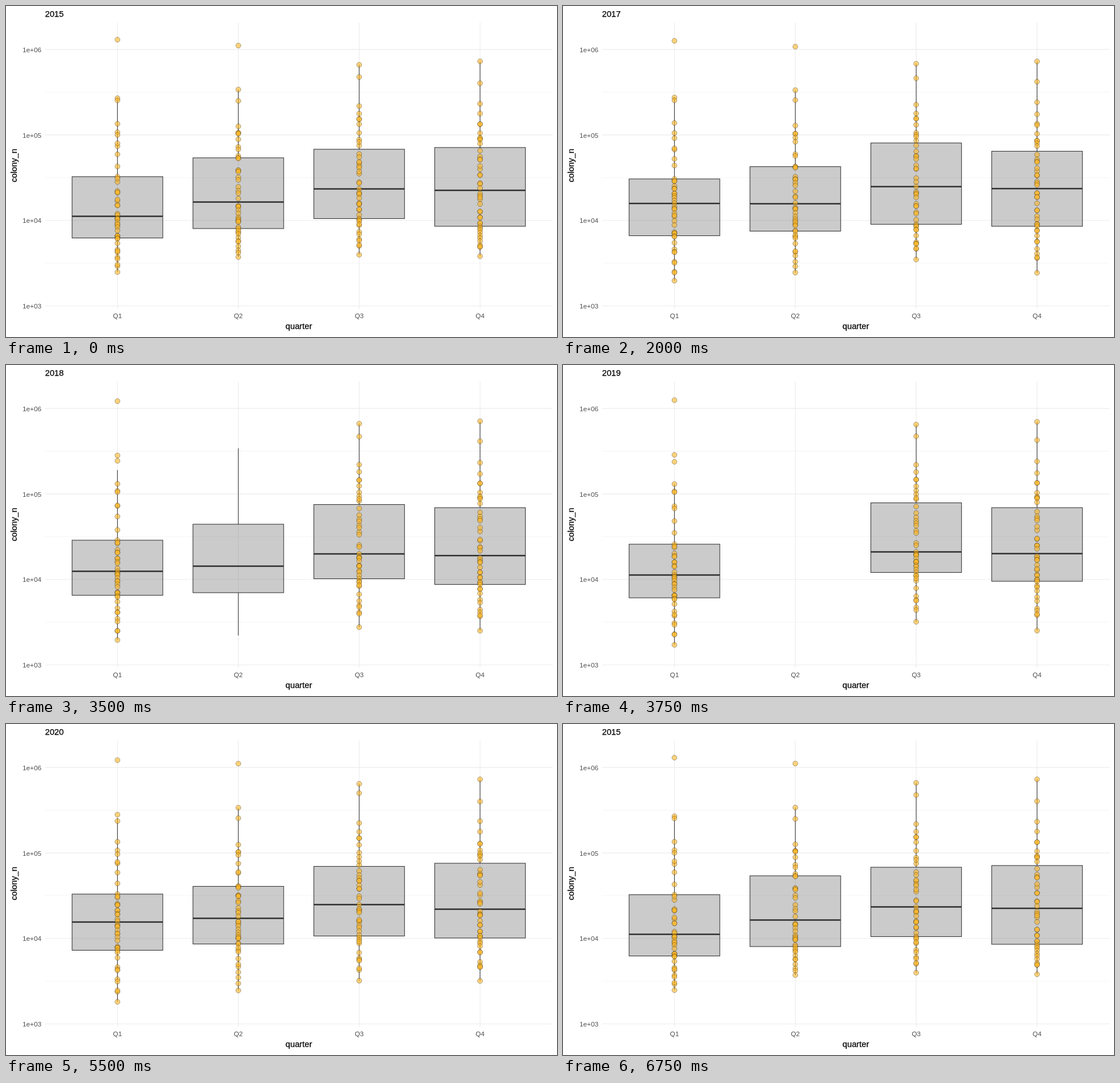
Recreate the animation shown at these times as an HTML page with a canvas. Size 966x580 px, loop 8000 ms.

```html
<!DOCTYPE html>
<html lang="en">
<head>
<meta charset="utf-8">
<title>Colonies by quarter</title>
<style>
  html, body { margin: 0; width: 100%; height: 100%; overflow: hidden; background: #fff; }
  canvas { display: block; }
</style>
</head>
<body>
<canvas id="chart" width="966" height="580"></canvas>
<script>
const ctx = document.getElementById('chart').getContext('2d');
const LOOP = 8000, TWEEN = 250, FIRST_YEAR = 2015;
const starts = [0, 1000, 2000, 3000, 3750, 4750, 5750, 6750];
const FONT = '"Liberation Sans", Arial, sans-serif';
const centerOf = quarter => 195.4 + quarter * 211.9;

// Heights of upper hinge, median and lower hinge, by year and quarter.
// An empty entry has rows without values; a missing entry has no rows.
const hinges = [
  [[299, 368.5, 406.5], [266, 343.5, 390], [251, 320.5, 372.5], [248, 323, 386]],
  [[304, 355.5, 403.5], [273.5, 359, 397], [251.5, 321.5, 379], [255, 321.5, 394.5]],
  [[303, 346, 402.5], [281.5, 346.5, 394.5], [240, 316.5, 382.5], [254.5, 320, 386]],
  [[300, 355, 399], [279, 352.5, 399], [247.5, 334.5, 385.5], [250, 337.5, 390]],
  [[314, 368, 408], [], [241.5, 327.5, 363.5], [250, 330.5, 379]],
  [[308, 355, 403], [284, 343, 386], [249.5, 316.5, 371.5], [244, 324.5, 375]],
  [[288, 339, 390], [285, 338, 385]]
];

// Typical heights of the largest values in each quarter.
const leaders = [
  [62, 159, 168, 206, 222],
  [69, 147, 164, 211, 224],
  [104, 124, 174, 186, 200],
  [98, 133, 171, 191, 207]
];

const lerp = (a, b, t) => a + (b - a) * t;
const clamp = t => Math.min(1, Math.max(0, t));
const halfway = (a, b) => a.map((v, i) => (v + b[i]) / 2);

function noise(seed) {
  const v = Math.sin(seed * 12.9898) * 43758.5453;
  return v - Math.floor(v);
}

// Each dot keeps its rank through the years, with a small yearly drift.
function makeGroup(hinge, year, quarter) {
  if (!hinge.length) return null;
  const [upper, median, lower] = hinge;
  const yearly = i => noise(year * 211 + quarter * 53 + i) - 0.5;
  const low = lower + 60 + year * 5 + yearly(99) * 24;
  const dots = leaders[quarter].map((y, i) => y + yearly(i) * 6);

  const scatter = (from, to, count, power = 1) => {
    for (let i = 0; i < count; i++) {
      const rank = dots.length;
      const shift = (noise(quarter * 67 + rank) - 0.5) * 2.2 + yearly(rank) * 0.8;
      dots.push(lerp(from, to, clamp((i + 0.5 + shift) / count) ** power));
    }
  };
  scatter(dots[4], upper, 6);
  scatter(upper, median, 11);
  scatter(median, lower, 11);
  scatter(lower, lerp(lower, low, 0.85), 10, 1.3);
  dots.push(low);

  const reach = upper - 1.5 * (lower - upper);
  const high = Math.min(...dots.filter(y => y >= reach));
  return { box: [high, upper, median, lower, low], dots };
}

const years = hinges.map((row, year) => row.map((hinge, q) => makeGroup(hinge, year, q)));

// Groups without values ahead lose their dots; groups without rows ahead wait.
function between(group, target) {
  if (!group || target === undefined) return group;
  if (!target) return { box: group.box, dots: [] };
  return { box: halfway(group.box, target.box), dots: halfway(group.dots, target.dots) };
}

function line(x1, y1, x2, y2, width, color) {
  ctx.lineWidth = width;
  ctx.strokeStyle = color;
  ctx.beginPath();
  ctx.moveTo(x1, y1);
  ctx.lineTo(x2, y2);
  ctx.stroke();
}

function text(label, x, y, size, align, color) {
  ctx.font = `${size}px ${FONT}`;
  ctx.textAlign = align;
  ctx.fillStyle = color;
  ctx.fillText(label, x, y);
}

function title(label, x, y, align) {
  text(label, x, y, 14.67, align, '#000');
  ctx.lineWidth = 0.25;
  ctx.strokeStyle = '#000';
  ctx.strokeText(label, x, y);
}

function drawAxes(year) {
  ctx.fillStyle = '#fff';
  ctx.fillRect(0, 0, 966, 580);
  for (let i = 0; i < 4; i++) {
    const x = centerOf(i), y = 76.1 + i * 149.8;
    if (i < 3) line(68.5, y + 74.9, 958.5, y + 74.9, 0.55, '#ebebeb');
    line(68.5, y, 958.5, y, 1.07, '#ebebeb');
    line(x, 29, x, 531, 1.07, '#ebebeb');
    text(`1e+0${6 - i}`, 62, y + 4.6, 11.73, 'right', '#4d4d4d');
    text(`Q${i + 1}`, x, 547, 11.73, 'center', '#4d4d4d');
  }
  title(year, 68.5, 19, 'left');
  title('quarter', 513.3, 566, 'center');
  ctx.save();
  ctx.translate(18.5, 279.5);
  ctx.rotate(-Math.PI / 2);
  title('colony_n', 0, 0, 'center');
  ctx.restore();
}

function drawBox(x, [high, upper, median, lower, low]) {
  const left = x - 79.5, width = 159;
  line(x, high, x, upper, 1.07, '#333');
  line(x, lower, x, low, 1.07, '#333');
  ctx.fillStyle = 'rgba(51,51,51,0.25)';
  ctx.fillRect(left, upper, width, lower - upper);
  ctx.strokeRect(left, upper, width, lower - upper);
  line(left, median, left + width, median, 2.4, '#2e2e2e');
}

function drawDots(x, dots) {
  ctx.fillStyle = 'rgba(253,184,36,0.6)';
  ctx.strokeStyle = 'rgba(0,0,0,0.55)';
  ctx.lineWidth = 0.6;
  for (const y of dots) {
    ctx.beginPath();
    ctx.arc(x, y, 4.4, 0, Math.PI * 2);
    ctx.fill();
    ctx.stroke();
  }
}

function draw(time) {
  const step = starts.findLastIndex(start => start <= time);
  const moving = time >= starts[step + 1] - TWEEN;
  const year = step % years.length;
  const target = years[(step + 1) % years.length];
  drawAxes(FIRST_YEAR + year);
  years[year].forEach((group, q) => {
    const shown = moving ? between(group, target[q]) : group;
    if (!shown) return;
    drawBox(centerOf(q), shown.box);
    drawDots(centerOf(q), shown.dots);
  });
}

const origin = performance.now();
function tick() {
  draw((performance.now() - origin) % LOOP);
  requestAnimationFrame(tick);
}
tick();
</script>
</body>
</html>
```
